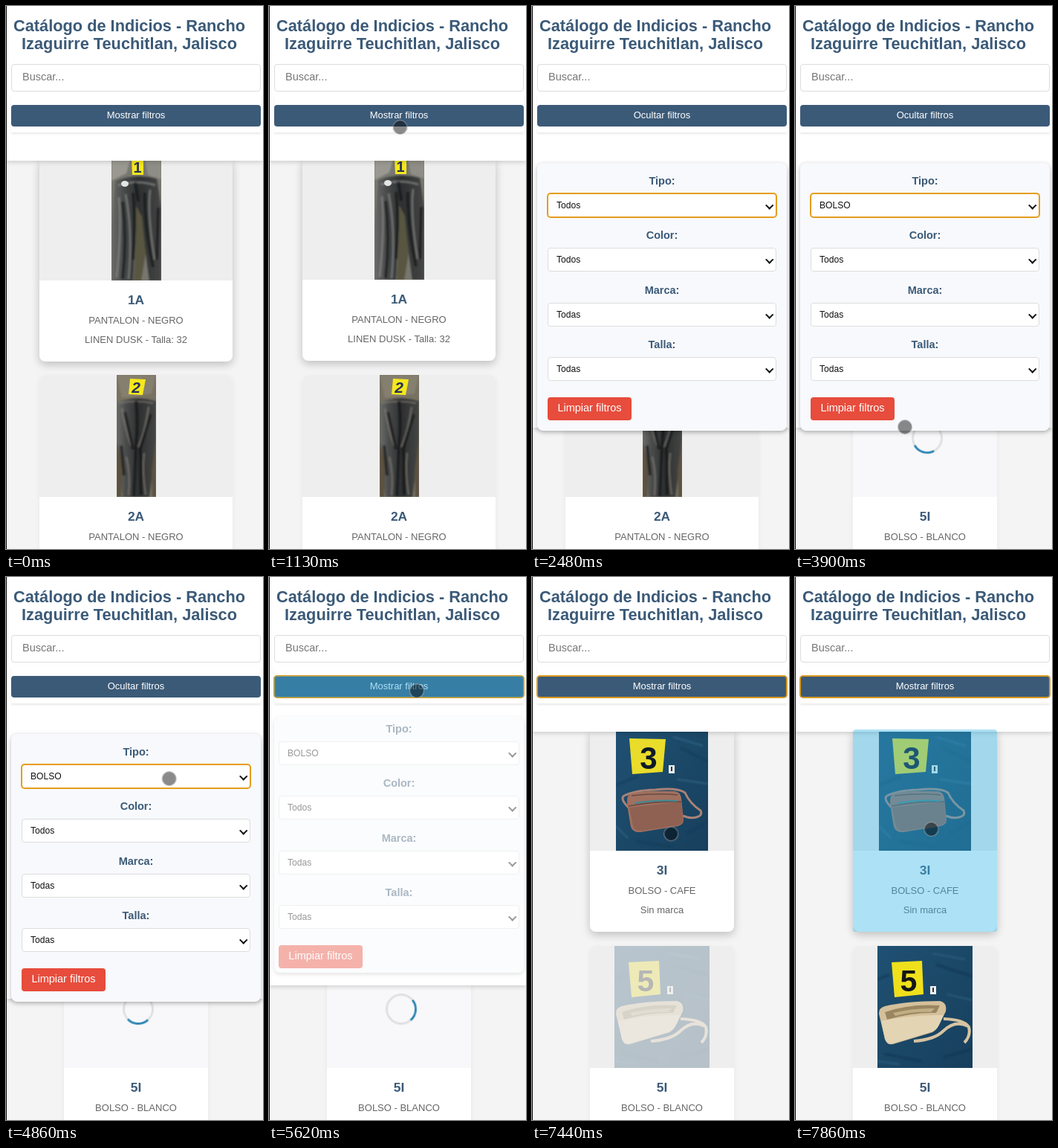
Write an HTML page that moves like this. It is 346x730 px and loops after 8 s.

```html
<!DOCTYPE html>
<html lang="es">
<head>
<meta charset="utf-8">
<title>Catálogo</title>
<style>
/* --shut: 0 = filter panel open, 1 = closed */
@property --shut { syntax: "<number>"; inherits: true; initial-value: 1; }

html, body { margin: 0; width: 100%; height: 100%; overflow: hidden; }
body {
  position: relative;
  background: #f4f4f4;
  color: #666;
  font: 13px/20px "Liberation Sans", Arial, sans-serif;
  text-align: center;
  --blue: #3b5a78;
  --tap: rgba(51, 181, 229, .4);
  --pad: calc(14px * (1 - var(--shut)));
  animation: panel 8s ease infinite;
}
* { box-sizing: border-box; }
h1, h3, p { margin: 0; }
.abs, .card, .card > *, header, header > *, .panel, .fields, .cursor, .tap { position: absolute; }
.step { animation: 8s step-end infinite; }

/* cards */
.card { height: 273px; background: #fff; border-radius: 8px; box-shadow: 0 2px 6px rgba(0, 0, 0, .06); }
.card.top { top: 204px; box-shadow: 0 4px 12px rgba(0, 0, 0, .22); }
.card.low { top: 495.5px; }
.card > * { left: 0; width: 100%; }
.wide .card { left: 45px; width: 260px; }
.slim .card { left: 78px; width: 194px; }
.wide .top { animation: settle 8s ease infinite; }
.wide { animation-name: first-list; }
.slim { animation-name: second-list; }
.pic { height: 164px; background: #eee; border-radius: 8px 8px 0 0; overflow: hidden; }
.pic svg { display: block; margin: 0 auto; }
.slim .pic { animation: loading-area 8s step-end infinite; }
.photo3 { animation: photo3 8s linear infinite; }
.photo5 { animation: photo5 8s linear infinite; }
.spin { position: absolute; left: 50%; top: 50%; margin: -18px; animation: spinner 8s step-end infinite; }
.spin::before {
  content: ""; display: block; width: 36px; height: 36px;
  border: 3px solid #e0e0e0; border-top-color: #2e86b5; border-radius: 50%;
  animation: turn 1s linear -.644s infinite;
}
h3 { top: 180px; font-size: 17.4px; color: var(--blue); }
.card p { top: 208px; }
.card p + p { top: 234px; }

/* header */
header {
  left: 0; top: 0; width: 100%;
  height: min(567px - 28px * var(--shut), 208px + 800px * (1 - var(--shut)));
  background: #fff; box-shadow: 0 2px 6px rgba(0, 0, 0, .16);
}
h1 { left: 0; top: 15px; width: 332px; font-size: 21.77px; line-height: 24px; color: var(--blue); white-space: nowrap; }
.band { left: 7px; top: 120px; width: 336px; height: 50px; box-shadow: 0 2px 3px rgba(0, 0, 0, .09); }
.search {
  left: 7px; top: 78px; width: 336px; height: 36.5px; padding-left: 14px;
  border: 1.5px solid #ddd; border-radius: 4px; background: #fff;
  font-size: 14.5px; line-height: 33px; text-align: left; color: #777;
}
.toggle { left: 7px; top: 132.5px; width: 336px; height: 29px; border-radius: 4px; background: var(--blue); color: #fff; line-height: 28px; animation-name: toggle-ring; }
.toggle span { position: absolute; inset: 0; border-radius: 4px; }
.show { animation-name: closed-label; }
.hide { animation-name: open-label; }
.flash { background: var(--tap); animation-name: toggle-tap; }

/* filters */
.panel {
  left: 7px; top: calc(211px - 40px * var(--shut)); width: 336px;
  height: min(360px - 28px * var(--shut), 840px * (1 - var(--shut)));
  opacity: calc(1 - var(--shut));
  overflow: hidden; border-radius: 8px; background: #f8f9fc;
  box-shadow: 0 2px 6px rgba(0, 0, 0, .28);
}
.fields { top: var(--pad); left: var(--pad); right: var(--pad); }
.field { height: 73.3px; }
.field b { display: block; font-size: 14.5px; color: var(--blue); }
.select {
  position: relative; height: 32px; margin-top: 7px; padding-left: 11px;
  border: 1px solid #ddd; border-radius: 4px; background: #fff;
  color: #111; font-size: 12.1px; line-height: 30px; text-align: left;
}
.select::after {
  content: ""; position: absolute; right: 5px; top: 11px; width: 5.5px; height: 5.5px;
  border: solid #111; border-width: 0 2px 2px 0; transform: rotate(45deg);
}
.kind { animation-name: select-ring; }
.select span { position: absolute; }
.any { animation-name: first-list; }
.picked { animation-name: second-list; }
.clear { margin-top: 8px; width: 113px; height: 31px; border-radius: 4px; background: #e74c3c; color: #fff; font-size: 14.5px; line-height: 29px; }

.tap { left: 78px; top: 205px; width: 194px; height: 272px; border-radius: 4px; background: var(--tap); animation-name: card-tap; }
.cursor {
  left: -10px; top: -10px; width: 20px; height: 20px; border-radius: 50%;
  background: rgba(0, 0, 0, .46); border: 1.5px solid rgba(255, 255, 255, .45);
  animation: move 8s linear infinite, seen 8s step-end infinite;
}
.edge { left: 0; top: 0; width: 1px; height: 100%; background: #111; }

@keyframes panel {
  0%, 16.75% { --shut: 1; }
  21.75%, 68.6% { --shut: 0; }
  73.6%, 100% { --shut: 1; }
}
@keyframes settle { 0%, 1.6% { transform: translateY(1px); } 5%, 100% { transform: none; } }
@keyframes first-list { 0% { visibility: visible; } 43.25%, 100% { visibility: hidden; } }
@keyframes second-list { 0% { visibility: hidden; } 43.25%, 100% { visibility: visible; } }
@keyframes closed-label { 0% { opacity: 1; } 16.75% { opacity: 0; } 68.6%, 100% { opacity: 1; } }
@keyframes open-label { 0% { opacity: 0; } 16.75% { opacity: 1; } 68.6%, 100% { opacity: 0; } }
@keyframes toggle-tap { 0% { opacity: 0; } 16.75% { opacity: 1; } 18.75% { opacity: 0; } 68.2% { opacity: 1; } 71.3%, 100% { opacity: 0; } }
@keyframes toggle-ring {
  0% { box-shadow: none; }
  16.75% { box-shadow: 0 0 0 1px #d99a1f, inset 0 0 0 1px #d99a1f; }
  31% { box-shadow: none; }
  68.6%, 100% { box-shadow: 0 0 0 1px #d99a1f, inset 0 0 0 1px #d99a1f; }
}
@keyframes select-ring {
  0% { box-shadow: none; border-color: #ddd; }
  31% { box-shadow: 0 0 0 1px #e59d1c; border-color: #e59d1c; }
  68.6%, 100% { box-shadow: none; border-color: #ddd; }
}
@keyframes loading-area { 0% { background: #f8f8fa; } 80%, 100% { background: #eee; } }
@keyframes spinner { 0% { opacity: 1; } 80%, 100% { opacity: 0; } }
@keyframes turn { to { transform: rotate(360deg); } }
@keyframes photo3 { 0%, 89.4% { opacity: 0; } 92.5%, 100% { opacity: 1; } }
@keyframes photo5 { 0%, 92.5% { opacity: 0; } 94.5%, 100% { opacity: 1; } }
@keyframes card-tap { 0% { opacity: 0; } 96.375%, 100% { opacity: 1; } }
@keyframes seen { 0% { opacity: 0; } 8% { opacity: 1; } 31% { opacity: 0; } 43.25%, 100% { opacity: 1; } }
@keyframes move {
  0%, 8% { transform: translate(260px, 330px); }
  11% { transform: translate(182px, 176px); }
  14.125%, 16.75% { transform: translate(176.5px, 163px); }
  20.875% { transform: translate(180px, 165px); }
  26.6% { transform: translate(144px, 273px); }
  29.25%, 31% { transform: translate(144px, 283px); }
  43.25% { transform: translate(160px, 440px); }
  48.75%, 53.4% { transform: translate(148px, 566px); }
  56.25% { transform: translate(100px, 470px); }
  60% { transform: translate(225px, 300px); }
  63% { transform: translate(204px, 186px); }
  64.4% { transform: translate(199px, 160px); }
  68%, 74.9% { transform: translate(199px, 153px); }
  80% { transform: translate(275px, 500px); }
  82.25% { transform: translate(288px, 522px); }
  84.75% { transform: translate(291px, 490px); }
  91.9% { transform: translate(190px, 350px); }
  94.5%, 100% { transform: translate(183.5px, 339px); }
}
</style>
</head>
<body>
<svg class="abs" width="0" height="0">
  <linearGradient id="denim">
    <stop stop-color="#6a6b69"/><stop offset=".25" stop-color="#484a4a"/>
    <stop offset=".55" stop-color="#2d2f30"/><stop offset="1" stop-color="#454645"/>
  </linearGradient>
  <linearGradient id="cloth" x2="1" y2="1">
    <stop stop-color="#1f5073"/><stop offset=".5" stop-color="#1b4867"/><stop offset="1" stop-color="#173f5d"/>
  </linearGradient>
  <filter id="soft"><feGaussianBlur stdDeviation="1.2"/></filter>
</svg>

<div class="wide step">
  <div class="card top">
    <div class="pic">
      <svg width="67" height="164" viewBox="141 204 67 164">
        <path fill="#77766f" d="M141 204h67v164h-67z"/>
        <g filter="url(#soft)">
          <path fill="#9a9991" d="M141 204h26l-6 20-20 10z"/>
          <path fill="#8f8e86" d="M186 204h22v28l-18-6z"/>
          <path fill="url(#denim)" d="M146 234q28-10 56-3l6 40v97h-16l-8-60-8-38-3 40-3 58h-29v-70z"/>
          <path fill="#595540" d="M174 268l8 14 5 50-6 36h-10l3-60z"/>
          <g fill="none" stroke="#8c8e8d" stroke-width="2.5" opacity=".65">
            <path d="M151 256q4 40-3 108M160 252q10 50 4 114M193 246q-4 32 6 94M150 240q26-8 50 0"/>
          </g>
          <g fill="none" stroke="#161819" stroke-width="4" opacity=".7">
            <path d="M156 262q6 50 0 104M170 250q4 40 0 90M186 250q-1 40 11 100M204 270l-2 70M173 236l4 26"/>
          </g>
        </g>
        <ellipse cx="159" cy="238" rx="5" ry="4" fill="#e4e6e6"/>
        <path fill="#f6e81c" d="M168 204h16v22h-15z"/>
        <text x="176" y="223" font-size="20" font-weight="700" text-anchor="middle" fill="#26305a">1</text>
      </svg>
    </div>
    <h3>1A</h3><p>PANTALON - NEGRO</p><p>LINEN DUSK - Talla: 32</p>
  </div>
  <div class="card low">
    <div class="pic">
      <svg width="53" height="164" viewBox="149 495 53 164">
        <path fill="#777161" d="M149 495h53v164h-53z"/>
        <g filter="url(#soft)">
          <path fill="#857f70" d="M149 495h53l-6 25-40 6z"/>
          <path fill="url(#denim)" d="M149 532q26-10 53-2v60l-9 69h-36l-8-72z"/>
          <path fill="#5b5140" d="M149 585l8 30-2 44h-6zM202 580l-6 44 1 35h5z"/>
          <g fill="none" stroke="#8c877e" stroke-width="2.2" opacity=".6">
            <path d="M156 540q5 30 12 50M192 538q-4 30-14 54M162 605q6 24 3 52M186 600q-3 24 2 56M152 533q23-5 46 0"/>
          </g>
          <g fill="none" stroke="#151617" stroke-width="4" opacity=".7">
            <path d="M175 530q3 30 0 58l-3 70M160 545l11 50M195 548l-14 46 1 62M155 590l4 40"/>
          </g>
        </g>
        <path fill="#f6e81c" d="M167 500l21 1-4 21-19-1z"/>
        <text x="175" y="519" font-size="21" font-weight="700" font-style="italic" text-anchor="middle" fill="#26305a">2</text>
      </svg>
    </div>
    <h3>2A</h3><p>PANTALON - NEGRO</p>
  </div>
</div>

<div class="slim step">
  <div class="card top">
    <div class="pic">
      <i class="spin"></i>
      <svg class="photo3" width="124" height="164" viewBox="113 204 124 164">
        <path fill="url(#cloth)" d="M113 204h124v164H113z"/>
        <g fill="none" filter="url(#soft)" stroke-width="3" opacity=".5">
          <path stroke="#123a57" d="M113 280l30-12M200 230l37 18M140 355l50 8M208 345l29-16"/>
          <path stroke="#34698c" d="M190 215l40 12M113 335l16 16M195 272l42 6"/>
        </g>
        <path fill="none" stroke="#a98377" stroke-width="3" d="M130 310q-12-12-6-16 14-7 42-8 30-3 40 4 6 14 21 24 3 7-6 9-8 2-18-2"/>
        <path fill="#a1705f" d="M132 292q10-5 60-4 8 1 9 9l3 30q0 6-8 8l-50 8q-10 1-13-7-5-28-5-36 0-6 4-8z"/>
        <path fill="#8f6152" d="M131 310l70-8 2 25q0 5-7 7l-48 7q-10 1-12-6z"/>
        <path fill="none" stroke="#6a4a42" stroke-width="1.5" d="M130 308q36-7 71-6M134 294q36-4 62-1"/>
        <path fill="none" stroke="#3f8a94" stroke-width="2" d="M138 304q30-5 58-3"/>
        <path fill="#e9dc2a" d="M131 217l49 1-4 44-41 3z"/>
        <text x="157" y="258" font-size="42" font-weight="700" text-anchor="middle" fill="#0e1a26">3</text>
        <path fill="#e8eef0" d="M184 253h8v11h-8z"/><path fill="#333" d="M187 255h2v6h-2z"/>
      </svg>
    </div>
    <h3>3I</h3><p>BOLSO - CAFE</p><p>Sin marca</p>
  </div>
  <div class="card low">
    <div class="pic">
      <i class="spin"></i>
      <svg class="photo5" width="128" height="164" viewBox="111 495 128 164">
        <path fill="url(#cloth)" d="M111 495h128v164H111z"/>
        <g fill="none" filter="url(#soft)" stroke-width="3" opacity=".5">
          <path stroke="#0f334e" d="M111 540l16-6M190 520l49 16M120 640l50 10M200 645l39-12"/>
          <path stroke="#2f6486" d="M185 505l44 8M205 560l34 8M111 650l30 4"/>
        </g>
        <path fill="none" stroke="#d6c3a2" stroke-width="4" d="M200 593q28 1 34 11 3 12-6 21M160 623q28-2 40-14 16-15 33-6"/>
        <path fill="#d4c09a" d="M113 586q0-8 8-10 30-7 74-7 10 2 8 14l-9 18q-4 9-12 11l-50 15q-8 2-11-7z"/>
        <path fill="#e3d4b4" d="M116 596q40-9 84-8l-6 13q-4 8-12 10l-50 15q-8 2-11-6z"/>
        <path fill="#9a8660" d="M121 584q34-12 74-9l-5 10q-32-1-66 9z"/>
        <path fill="#c2ae84" d="M132 585q28-7 56-6l-5 5q-24-1-48 5z"/>
        <path fill="#f0e01c" d="M130 517l41-2 2 45-39 4z"/>
        <text x="153" y="556" font-size="41" font-weight="700" text-anchor="middle" fill="#151515">5</text>
        <path fill="#f0f0f0" d="M182 549h8v11h-8z"/><path fill="#333" d="M185 551h2v6h-2z"/>
      </svg>
    </div>
    <h3>5I</h3><p>BOLSO - BLANCO</p>
  </div>
</div>

<header>
  <h1>Catálogo de Indicios - Rancho<br>Izaguirre Teuchitlan, Jalisco</h1>
  <div class="band"></div>
  <div class="search">Buscar...</div>
  <div class="toggle step">
    <span class="show step">Mostrar filtros</span>
    <span class="hide step">Ocultar filtros</span>
    <span class="flash step"></span>
  </div>
</header>

<div class="panel">
  <div class="fields">
    <div class="field"><b>Tipo:</b><div class="select kind step"><span class="any step">Todos</span><span class="picked step">BOLSO</span></div></div>
    <div class="field"><b>Color:</b><div class="select">Todos</div></div>
    <div class="field"><b>Marca:</b><div class="select">Todas</div></div>
    <div class="field"><b>Talla:</b><div class="select">Todas</div></div>
    <div class="clear">Limpiar filtros</div>
  </div>
</div>

<div class="tap step"></div>
<div class="cursor"></div>
<div class="edge abs"></div>
</body>
</html>
```
